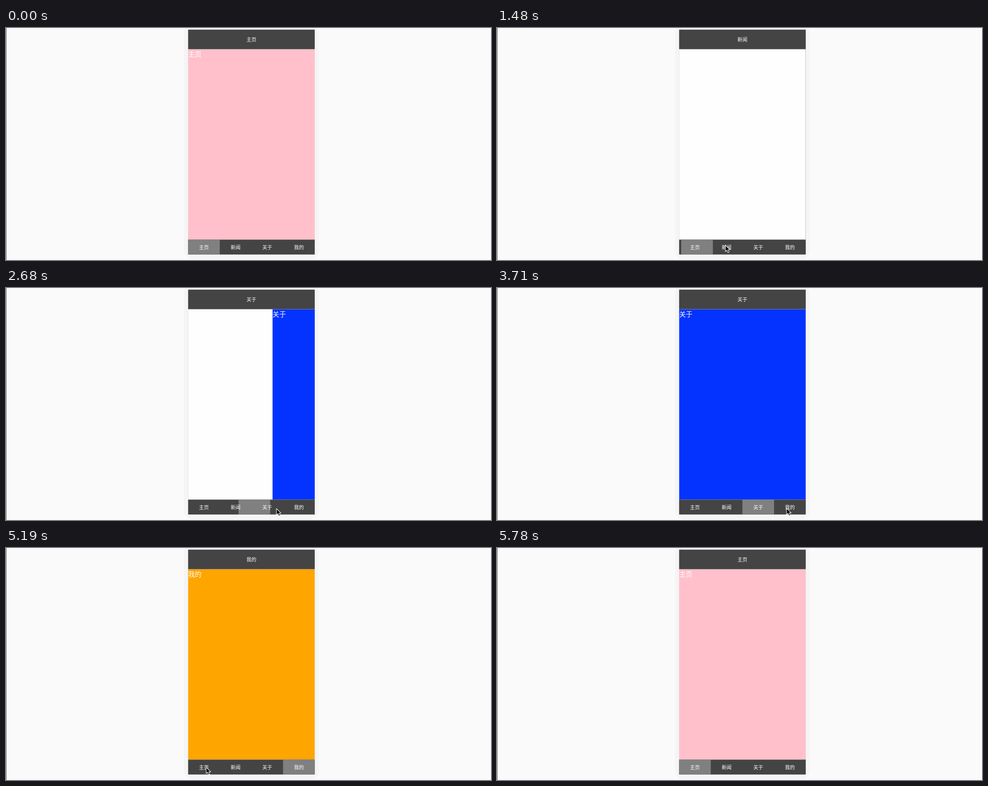
Write an HTML page that moves like this. It is 1082 by 518 pixels and loops after 6830 ms.

```html
<!DOCTYPE html>
<html lang="zh-CN">
<head>
<meta charset="utf-8">
<title>Tab bar</title>
<style>
  html, body { margin: 0; width: 100%; height: 100%; overflow: hidden; background: #fafafa; }
  svg { display: block; width: 1082px; height: 518px; }
  text {
    font: 500 11px "Noto Sans CJK SC", "Noto Sans CJK", "Noto Sans", sans-serif;
    fill: #fff;
  }
  #label { font-size: 14.8px; }
</style>
</head>
<body>
<svg viewBox="0 0 1082 518">
  <defs>
    <clipPath id="screen"><rect x="406.3" y="47.3" width="282.5" height="425.4"/></clipPath>
  </defs>
  <rect width="1" height="518" fill="#5a5a5a"/>
  <rect x="397" y="-8" width="301" height="524.5" rx="20" fill="#f5f5f5"/>
  <rect x="406" y="3" width="283" height="504" fill="#fefefe"/>
  <path d="M406.5 47V473M688.5 47V473" stroke="#e6e6e6"/>
  <g clip-path="url(#screen)">
    <g id="page">
      <rect id="fill" x="406.3" y="47" width="282.5" height="426"/>
      <text id="label" x="406.5" y="63.8"></text>
    </g>
  </g>
  <rect x="406.3" y="3.6" width="282.5" height="43.6" fill="#444"/>
  <rect x="406.3" y="472.5" width="282.5" height="33.3" fill="#444"/>
  <rect id="mark" x="406.3" y="472.5" width="70.6" height="33.3" fill="#808080"/>
  <path d="M406.3 47.4H688.8M406.3 472.4H688.8" stroke="#999" stroke-opacity=".6" stroke-width=".8"/>
  <text id="title" x="547.5" y="30.2" text-anchor="middle"></text>
  <g id="tabs" text-anchor="middle"></g>
  <path id="cursor" d="M0 0V14.2L3.3 11.2L5.6 16.6L8.2 15.5L5.9 10.3H10.4Z"
        fill="#000" stroke="#fff" stroke-width="1.1" stroke-linejoin="round"/>
</svg>
<script>
  const LOOP = 6830, WIDTH = 282.4, TAB = 70.6;
  const tabs = [
    { name: "主页", color: "#ffc0cb" },
    { name: "新闻", color: "#008f00" },
    { name: "关于", color: "#0433ff" },
    { name: "我的", color: "#ffa500" },
  ];

  // The picture only changes on these beats.
  const beats = [
    0, 750, 890, 1040, 1480, 1630, 1780, 1930, 2080, 2230, 2530, 2680, 2830, 2970,
    3270, 3420, 3560, 3710, 4160, 4300, 4450, 4600, 4750, 4900, 5040, 5190, 5490, 5640, 5780,
  ];

  // Progress of the marker and of the incoming page, beat by beat.
  const switches = [
    { at: 0, from: 0, to: 0, mark: [], slide: [] },
    { at: 1480, from: 0, to: 1, mark: [0.066, 0.84], slide: [0, 0.55, 0.96] },
    { at: 2530, from: 1, to: 2, mark: [0.066, 0.593, 0.98], slide: [0, 0.333, 0.85] },
    { at: 4160, from: 2, to: 3, mark: [0.66], slide: [0.25, 0.779] },
    { at: 5490, from: 3, to: 0, mark: [0.066, 0.84], slide: [0, 0.55] },
  ];

  // Cursor stops: time, x, y
  const stops = [
    [600, 513, 540], [750, 512, 503], [1040, 509.5, 485],
    [1740, 509.5, 485], [2230, 603.3, 492.5],
    [3120, 603.3, 492.5], [3710, 646, 491.8],
    [4450, 646, 491.8], [5190, 446.5, 489.5],
    [5490, 446.5, 489.5], [5780, 449, 522],
  ];

  const el = id => document.getElementById(id);
  const move = (id, x, y = 0) => el(id).setAttribute("transform", `translate(${x} ${y})`);
  const mix = (a, b, u) => a + (b - a) * u;
  const smooth = u => u * u * (3 - 2 * u);

  tabs.forEach(({ name }, i) => {
    const text = document.createElementNS("http://www.w3.org/2000/svg", "text");
    text.setAttribute("x", 406.3 + TAB * (i + 0.5));
    text.setAttribute("y", 494);
    text.textContent = name;
    el("tabs").append(text);
  });

  function cursorAt(time) {
    const next = stops.findIndex(stop => stop[0] > time);
    const b = stops.at(next);
    const a = next > 0 ? stops[next - 1] : b;
    const u = a === b ? 0 : smooth((time - a[0]) / (b[0] - a[0]));
    return [mix(a[1], b[1], u), mix(a[2], b[2], u)];
  }

  function draw(time) {
    const beat = beats.findLastIndex(t => t <= time);
    const { at, from, to, mark, slide } = switches.findLast(s => s.at <= time);
    const i = beat - beats.indexOf(at);
    const { name, color } = tabs[to];
    el("title").textContent = name;
    el("label").textContent = name;
    el("fill").setAttribute("fill", color);
    move("page", (1 - (slide[i] ?? 1)) * WIDTH);
    move("mark", mix(from, to, mark[i] ?? 1) * TAB);
    move("cursor", ...cursorAt(beats[beat]));
  }

  const start = performance.now();
  function tick() {
    draw((performance.now() - start) % LOOP);
    requestAnimationFrame(tick);
  }
  tick();
</script>
</body>
</html>
```
